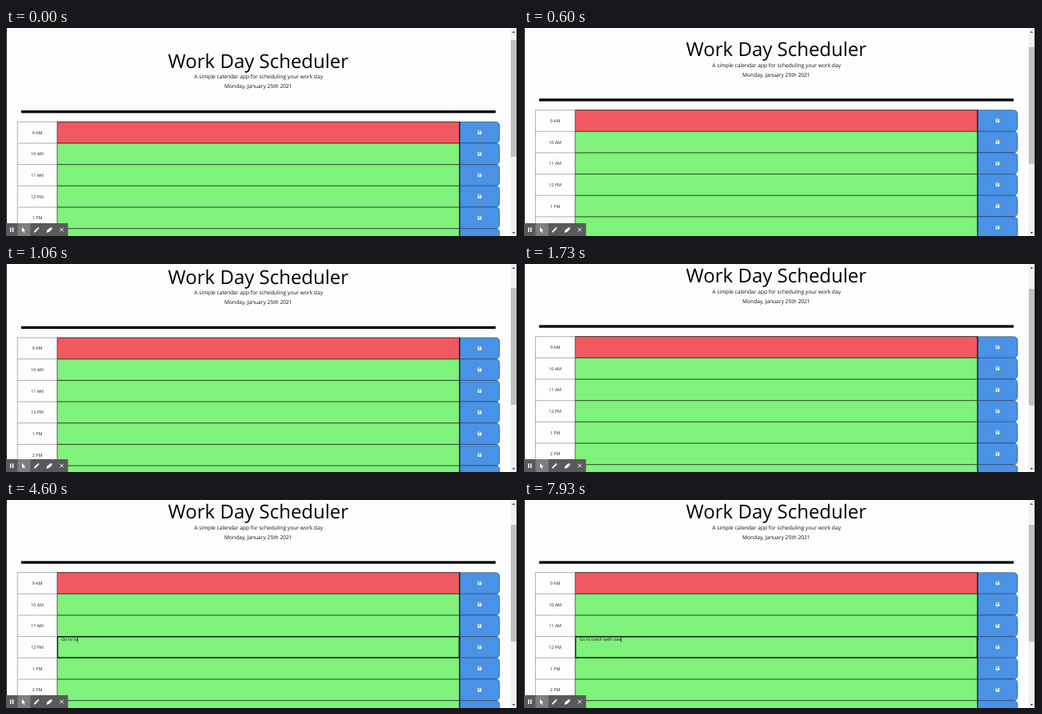
An HTML page with a canvas for the animation above (8 s loop, 640 px wide and 260 px high).

```html
<!DOCTYPE html>
<html lang="en">
<head>
<meta charset="utf-8">
<title>Work Day Scheduler</title>
<style>
  html, body { margin: 0; width: 100%; height: 100%; overflow: hidden; background: #fdfdfd; }
  canvas { display: block; width: 640px; height: 260px; }
</style>
</head>
<body>
<canvas id="stage" width="640" height="260"></canvas>
<script>
const ctx = document.getElementById('stage').getContext('2d');
const LOOP = 8000, STEP = 200 / 3, BLINK = 530;
const FONT = '"Open Sans", "Noto Sans", sans-serif';
const HOURS = ['9 AM', '10 AM', '11 AM', '12 PM', '1 PM', '2 PM', '3 PM'];
const ROW_H = 80, TABLE_Y = 352, FOCUS_ROW = 3, FOCUS_AT = 2400;
const RED = '#f15960', GREEN = '#7ef27a', BLUE = '#4a92e6';

const NOTE = 'Go to lunch with cow';
const KEYS = [3200, 3330, 3460, 3600, 3800, 4000, 4260, 4600, 4800, 5000, 5200,
  6460, 6600, 6730, 6860, 7000, 7200, 7460, 7600, 7800];

// [time, scroll distance in page pixels]
const SCROLL = [[0, 0], [333, 26], [867, 62.5], [1133, 80]];

function scrollAt(t) {
  for (let i = 1; i < SCROLL.length; i++) {
    const [t0, y0] = SCROLL[i - 1], [t1, y1] = SCROLL[i];
    if (t < t1) return y0 + (y1 - y0) * (t - t0) / (t1 - t0);
  }
  return SCROLL[SCROLL.length - 1][1];
}

function rect(x, y, w, h, color) {
  ctx.fillStyle = color;
  ctx.fillRect(x, y, w, h);
}

function poly(points, color) {
  ctx.fillStyle = color;
  ctx.beginPath();
  points.forEach(([x, y]) => ctx.lineTo(x, y));
  ctx.closePath();
  ctx.fill();
}

function line(x0, y0, x1, y1, width, color) {
  ctx.strokeStyle = color;
  ctx.lineWidth = width;
  ctx.beginPath();
  ctx.moveTo(x0, y0);
  ctx.lineTo(x1, y1);
  ctx.stroke();
}

function text(str, x, y, size, color = '#111', align = 'center') {
  ctx.font = size + 'px ' + FONT;
  ctx.textAlign = align;
  ctx.fillStyle = color;
  ctx.fillText(str, x, y);
}

function saveIcon(x, y) {
  ctx.fillStyle = '#fff';
  ctx.beginPath();
  ctx.roundRect(x - 7, y - 7, 14, 14, [2, 4, 2, 2]);
  ctx.fill();
  rect(x - 5, y - 5, 8.5, 4, BLUE);
  ctx.fillStyle = BLUE;
  ctx.beginPath();
  ctx.arc(x, y + 3, 2.2, 0, Math.PI * 2);
  ctx.fill();
}

function row(i) {
  const y = TABLE_Y + i * ROW_H;
  line(43, y, 43, y + ROW_H, 2, '#888');
  line(42, y, 192, y, 2, '#888');
  text(HOURS[i], 117, y + 46, 16, '#222');

  rect(192, y, 1509, ROW_H, i ? GREEN : RED);
  ctx.fillStyle = BLUE;
  ctx.beginPath();
  ctx.roundRect(1701, y, 150, ROW_H, [0, 14, 14, 0]);
  ctx.fill();
  ctx.strokeStyle = 'rgba(0,0,0,.55)';
  ctx.lineWidth = 2;
  ctx.stroke();
  saveIcon(1776, y + 40);

  line(192, y, 1701, y, 2.2, '#000');
  line(192, y, 192, y + ROW_H, 2, '#222');
  line(1701, y, 1701, y + ROW_H, 3, '#000');
}

function editor(t) {
  if (t < FOCUS_AT) return;
  const y = TABLE_Y + FOCUS_ROW * ROW_H;
  ctx.strokeStyle = '#000';
  ctx.lineWidth = 3;
  ctx.strokeRect(194, y + 1, 1505, ROW_H - 2);

  const count = KEYS.filter(k => k <= t).length;
  const typed = NOTE.slice(0, count);
  text(typed, 208, y + 16, 16, '#111', 'left');
  const last = count ? KEYS[count - 1] : FOCUS_AT;
  if (Math.floor((t - last) / BLINK) % 2 === 0) {
    rect(208 + ctx.measureText(typed).width, y + 2, 2, 19, '#000');
  }
}

function page(t, scroll) {
  ctx.save();
  ctx.scale(1 / 3, 1 / 3);
  ctx.translate(0, -scroll);
  text('Work Day Scheduler', 946, 150, 72, '#000');
  text('A simple calendar app for scheduling your work day', 947, 190, 20);
  text('Monday, January 25th 2021', 946, 226, 20);
  rect(57, 309, 1779, 10, '#000');
  HOURS.forEach((_, i) => row(i));
  editor(t);
  ctx.restore();
}

function scrollbar(scroll) {
  rect(630.7, 0, 7.6, 260, '#f1f1f1');
  rect(631, 15 + scroll * 0.2, 7, 146, '#c1c1c1');
  poly([[632.7, 6], [636.3, 6], [634.5, 3.8]], '#444');
  poly([[632.7, 255], [636.3, 255], [634.5, 257.2]], '#444');
  rect(638.3, 0, 1.7, 260, '#000');
  rect(0, 0, 0.9, 260, '#000');
}

function toolbar() {
  rect(0, 244, 77.5, 16, '#59595b');
  rect(14.5, 244, 16, 16, '#7e7e80');
  rect(5.1, 249.4, 1.5, 5.6, '#fff');
  rect(8, 249.4, 1.5, 5.6, '#fff');
  poly([[20, 249], [20, 255], [21.4, 253.8], [22.4, 256], [23.4, 255.5],
    [22.4, 253.4], [24.2, 253.2]], '#fff');
  line(36, 254.5, 40, 250.5, 1.8, '#fff');
  poly([[34.9, 255.6], [35.3, 253.7], [36.8, 255.2]], '#fff');
  line(40.2, 250.3, 41, 249.5, 1.8, '#fff');
  poly([[50.5, 255.8], [51.2, 252.8], [55.2, 249.6], [57.8, 249.2],
    [57.2, 252], [53.4, 255.2]], '#fff');
  line(67.3, 249.8, 71.9, 254.4, 1, '#fff');
  line(71.9, 249.8, 67.3, 254.4, 1, '#fff');
}

function draw(now) {
  const t = Math.floor((now % LOOP + 7) / STEP) * STEP + 0.01;
  const scroll = scrollAt(t);
  rect(0, 0, 640, 260, '#fdfdfd');
  page(t, scroll);
  scrollbar(scroll);
  toolbar();
}

ctx.textRendering = 'geometricPrecision';
let start;
function tick(now) {
  if (start === undefined) start = now;
  draw(now - start);
  requestAnimationFrame(tick);
}
draw(0);
requestAnimationFrame(tick);
</script>
</body>
</html>
```
